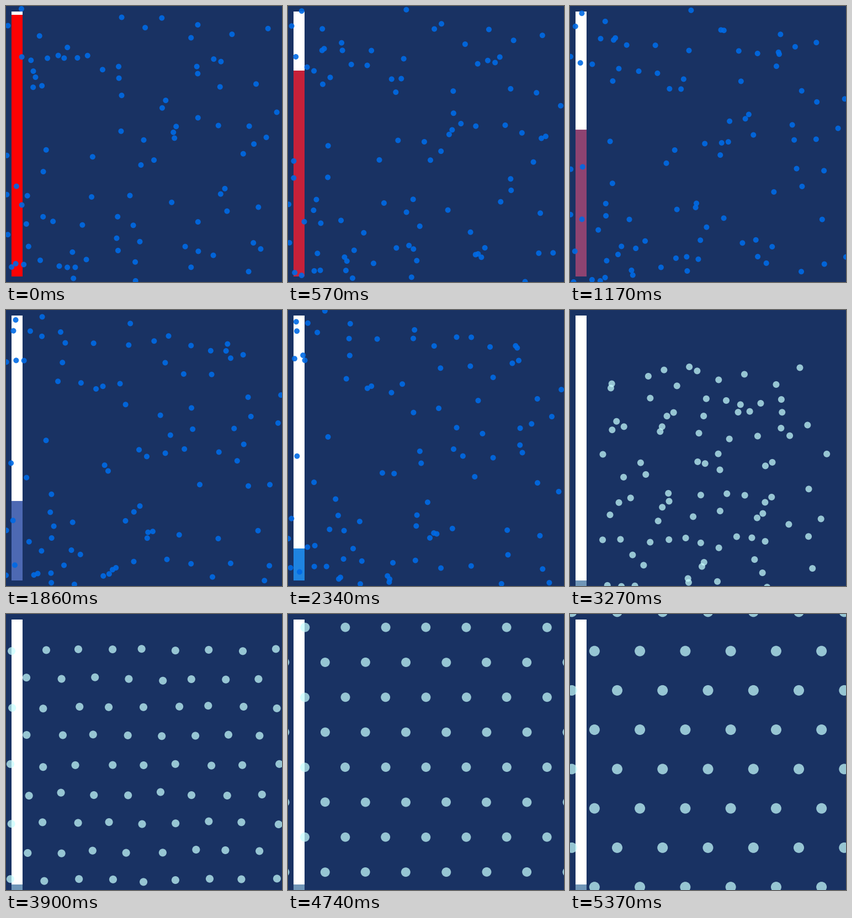
Recreate the animation shown at these times as a matplotlib script. Size 500 by 500 pixels, loop 5.4 s.

```python
import numpy as np
import matplotlib.pyplot as plt
from matplotlib.animation import FuncAnimation
from matplotlib.patches import Rectangle

SIZE, FRAMES, COOLED = 500, 180, 90
BACK = (25 / 255, 50 / 255, 99 / 255)
GAS = (0, 106 / 255, 230 / 255, 0.9)
FROZEN = (200 / 255, 1, 1, 0.72)
HOT, COLD = np.array([255, 0, 0]) / 255, np.array([0, 150, 255]) / 255
CHILL = (112 / 255, 150 / 255, 184 / 255)
GAP = 25 * np.sqrt(3)
SETTLE = 0.9

rng = np.random.default_rng(12)


def lattice():
    """Hexagonal sites, relative to the middle of the stage."""
    return np.array([(GAP * (i + 0.5 * (j % 2)), 16.25 + GAP * np.sqrt(0.75) * j)
                     for j in range(-4, 7) for i in range(-4, 5 - j % 2)])


sites = lattice()
gas_start = rng.uniform(0, SIZE, sites.shape)
gas_speed = rng.uniform(-1, 1, sites.shape)
pool = rng.uniform((0, 130), (480, 505), sites.shape) - SIZE / 2


def gas_at(n):
    """Straight flight with bounces off the edges."""
    return SIZE - np.abs((gas_start + gas_speed * n) % (2 * SIZE) - SIZE)


def crystal_at(n):
    """Molecules settle on their sites while the view zooms in."""
    step = n - COOLED + 1
    zoom = 1 + step / 100
    spots = sites + (pool - sites) * SETTLE ** step
    return SIZE / 2 + spots * zoom, 5 * zoom


fig = plt.figure(figsize=(5, 5), dpi=100, facecolor=BACK)
ax = fig.add_axes((0, 0, 1, 1))
ax.set_xlim(0, SIZE)
ax.set_ylim(SIZE, 0)
ax.axis("off")

ax.add_patch(Rectangle((10, 10), 20, 480, fc="white", lw=0, zorder=1))
level = ax.add_patch(Rectangle((10, 10), 20, 480, lw=0, zorder=2))
dots = ax.scatter([], [], linewidths=0, zorder=3)


def update(n):
    cooling = (n + 1) / COOLED
    drop = np.ceil(480 * cooling)
    level.set_y(10 + drop)
    level.set_height(480 - drop)
    if n < COOLED:
        level.set_facecolor(HOT + (COLD - HOT) * cooling)
        spots, radius, color = gas_at(n), 5, GAS
    else:
        level.set_facecolor(CHILL)
        (spots, radius), color = crystal_at(n), FROZEN
    dots.set_offsets(spots)
    dots.set_sizes(np.full(len(spots), (2 * radius * 72 / fig.dpi) ** 2))
    dots.set_facecolor(color)
    return level, dots


anim = FuncAnimation(fig, update, frames=FRAMES, interval=30,
                     repeat=True, repeat_delay=0)
plt.show()
```
